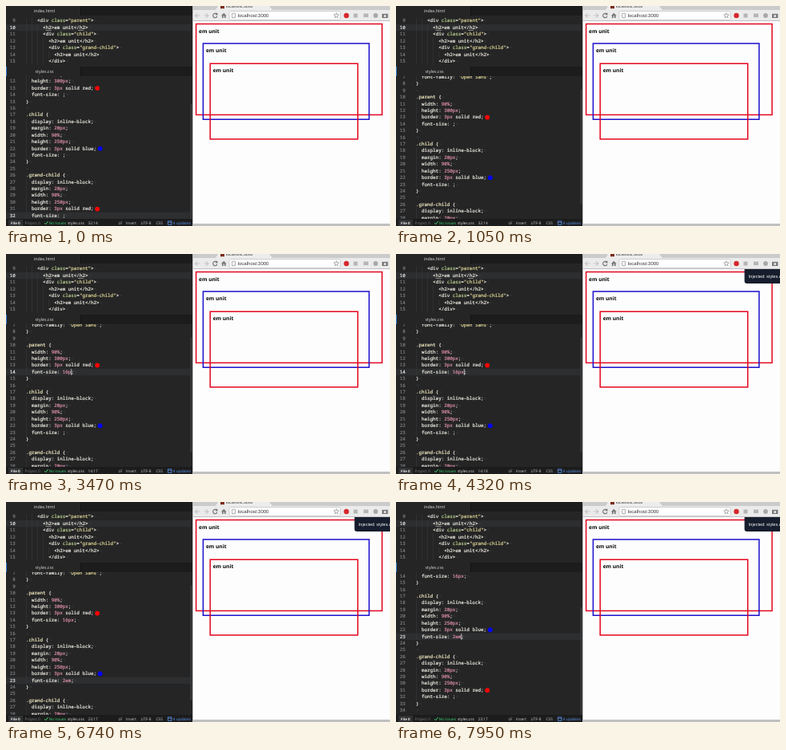
These frames come from a looping animation (480 px wide and 276 px high, 8000 ms). An HTML page with a canvas:

```html
<!DOCTYPE html>
<html lang="en">
<head>
<meta charset="utf-8">
<title>em unit</title>
<style>
html, body { margin: 0; width: 100%; height: 100%; overflow: hidden; background: #252526; }
canvas { display: block; width: 480px; height: 276px; }
</style>
</head>
<body>
<canvas id="stage"></canvas>
<script>
const W = 480, H = 276, LOOP = 8000;
const CHAR = 3.52, PITCH = 8.42, CODE_X = 25;
const MONO = '5.87px "Noto Sans Mono", "DejaVu Sans Mono", monospace';
const SANS = '"Open Sans", "Noto Sans", sans-serif';
const ARIAL = '"Liberation Sans", sans-serif';
const C = {
  bg: '#252526', bar: '#1c1c1d', line: '#2d2e30', plain: '#e6e4da',
  name: '#ece5bd', value: '#d48ba0', string: '#d8d092', attr: '#b5cc8a',
  faint: '#4a4c4d', guide: '#38393a', number: '#77797a', active: '#e0e0e0'
};

const canvas = document.getElementById('stage');
const ctx = canvas.getContext('2d');
const dpr = window.devicePixelRatio || 1;
canvas.width = W * dpr;
canvas.height = H * dpr;

const markup = [
  '    <div class="parent">', '      <h2>em unit</h2>', '      <div class="child">',
  '        <h2>em unit</h2>', '        <div class="grand-child">',
  '          <h2>em unit</h2>', '        </div>'
];

// Timed editor events: caret moves, keystrokes and the first save.
const keys = [
  { at: 2900, line: 14, text: '1' }, { at: 3060, line: 14, text: '16' },
  { at: 3350, line: 14, text: '16p' }, { at: 3500, line: 14, text: '16px' },
  { at: 4900, line: 23, text: '2' }, { at: 5060, line: 23, text: '2e' },
  { at: 5230, line: 23, text: '2em' }
];
const moves = [
  { at: -400, line: 32, text: '' }, { at: 1900, line: 14, text: '' }, { at: 4700, line: 23, text: '' }
];
const edits = [...moves, ...keys].sort((a, b) => a.at - b.at);
const SAVED = 4260;

const clamp = v => Math.max(0, Math.min(1, v));
const easeOut = p => 1 - (1 - p) * (1 - p);
const last = (list, t) => list.filter(e => e.at <= t).pop();

// Centre of line 14 as the pane scrolls.
const REST = 111.5;
function scrollY(t) {
  const up = easeOut(clamp((t - 80) / 740));
  const down = easeOut(clamp((t - 6850) / 857));
  return REST + 36.6 * up - 55 * down;
}

function rect(x, y, w, h, color) {
  ctx.fillStyle = color;
  ctx.fillRect(x, y, w, h);
}

function text(str, x, y, font, color, align = 'left') {
  ctx.font = font;
  ctx.fillStyle = color;
  ctx.textAlign = align;
  ctx.fillText(str, x, y);
}

// Medium weight: a thin outline around the regular face.
function codeText(str, x, y, color, align) {
  text(str, x, y, MONO, color, align);
  ctx.strokeStyle = color;
  ctx.lineWidth = 0.22;
  ctx.strokeText(str, x, y);
}

function stroke(color, width, path) {
  ctx.strokeStyle = color;
  ctx.lineWidth = width;
  ctx.beginPath();
  path();
  ctx.stroke();
}

function disc(x, y, r, color) {
  ctx.fillStyle = color;
  ctx.beginPath();
  ctx.arc(x, y, r, 0, 7);
  ctx.fill();
}

function clip(x, y, w, h, draw) {
  ctx.save();
  ctx.beginPath();
  ctx.rect(x, y, w, h);
  ctx.clip();
  draw();
  ctx.restore();
}

function htmlColor(token) {
  if (token[0] === '"') return C.string;
  return token === 'class' ? C.attr : C.plain;
}

function cssColor(token) {
  if (token[0] === "'") return C.string;
  if (token[0] === '.') return C.name;
  return /^\d/.test(token) ? C.value : C.plain;
}

function codeLine(number, source, y, active, pattern, color) {
  if (active) rect(0, y - 4.3, 231, PITCH, C.line);
  codeText(number, 11.7, y, active ? C.active : C.number, 'right');
  const indent = source.search(/\S|$/);
  for (let i = 0; i < indent; i += 2) {
    rect(CODE_X + i * CHAR, y - PITCH / 2, 0.6, PITCH, C.guide);
  }
  for (const m of source.matchAll(pattern)) {
    codeText(m[0], CODE_X + m.index * CHAR, y, color(m[0]));
  }
  text('¬', CODE_X + source.length * CHAR, y, MONO, C.faint);
}

function block(selector, height, color, size, extra) {
  return [
    selector + ' {', ...extra, '  width: 90%;', `  height: ${height}px;`,
    `  border: 3px solid ${color};`, `  font-size: ${size};`, '}', ''
  ];
}

function styles(t) {
  const typed = n => (last(keys.filter(k => k.line === n), t) || { text: '' }).text;
  const inline = ['  display: inline-block;', '  margin: 20px;'];
  return [
    "  font-family: 'Open Sans';", '}', '',
    ...block('.parent', 300, 'red', typed(14), []),
    ...block('.child', 250, 'blue', typed(23), inline),
    ...block('.grand-child', 250, 'red', '', inline)
  ];
}

function tab(y, label) {
  rect(0, y, 233, 12, C.bar);
  rect(0, y, 93, 12, C.bg);
  rect(93, y, 0.7, 12, '#111');
  text(label, 48, y + 6.2, `5.3px ${SANS}`, '#e4e4e4', 'center');
}

function markupPane() {
  markup.forEach((source, i) => {
    codeLine(9 + i, source, 18.8 + i * PITCH, i === 1, /"[^"]*"|em unit|[\w-]+|[<>\/=]+/g, htmlColor);
  });
  rect(49.5, 30.2, 7, 0.7, '#a5a99e');
  rect(90, 30.2, 7, 0.7, '#a5a99e');
  tab(0, 'index.html');
}

function stylePane(t) {
  const top = scrollY(t);
  const edit = last(edits, t);
  const lineY = n => top + (n - 14) * PITCH;
  clip(0, 88, 233, 179, () => {
    styles(t).forEach((source, i) => {
      const n = 7 + i, y = lineY(n);
      codeLine(n, source, y, n === edit.line, /'[^']*'|\.[\w-]+|[\w%-]+|[:;{}]/g, cssColor);
      const swatch = source.match(/solid (\w+);/);
      if (swatch) disc(CODE_X + source.length * CHAR + 4.7, y, 2.9, swatch[1] === 'red' ? '#f80404' : '#0404f8');
    });
    if ((t - edit.at) % 800 < 400) {
      rect(CODE_X + (13 + edit.text.length) * CHAR, lineY(edit.line) - 3.9, 0.8, 7.8, '#d5d9dc');
    }
    rect(230.6, 123 - (top - REST) * 0.5, 1.8, 144, '#3b3d3f');
  });
  tab(76, 'styles.css');
  rect(0, 76, 1, 12, '#3d7fd6');
}

function statusBar(t) {
  const edit = last(edits, t), y = 272.4;
  const put = (str, x, color = '#cfd1d2') => text(str, x, y, `4.8px ${SANS}`, color);
  rect(0, 267, 233, 9, '#1c1c1d');
  rect(3, 268, 18, 8, '#303132');
  text('File 0', 6, y, `bold 4.5px ${SANS}`, '#eee');
  put('Project 0', 23.5, '#777a7c');
  stroke('#3fd673', 1, () => {
    ctx.moveTo(48, 272.2);
    ctx.lineTo(49.7, 273.8);
    ctx.lineTo(52.5, 270.2);
  });
  put('No Issues', 53.5, '#3fd673');
  put('styles.css', 77, '#e4e4e4');
  put(`${edit.line}:${14 + edit.text.length}`, 102.5);
  put('LF', 140.5);
  put('Insert', 150);
  put('UTF-8', 168.5);
  put('CSS', 187.5);
  stroke('#5f97f0', 0.8, () => ctx.rect(202.4, 269.9, 4.6, 4.4));
  stroke('#5f97f0', 0.6, () => {
    ctx.moveTo(202.4, 271.5);
    ctx.lineTo(207, 271.5);
  });
  put('4 updates', 208.8, '#5f97f0');
}

function arrow(x, dir) {
  stroke('#c6c6c6', 1.2, () => {
    ctx.moveTo(x - 3 * dir, 12);
    ctx.lineTo(x + 3 * dir, 12);
    ctx.moveTo(x, 9.4);
    ctx.lineTo(x + 3 * dir, 12);
    ctx.lineTo(x, 14.6);
  });
}

function home(x) {
  ctx.fillStyle = '#777';
  ctx.beginPath();
  ctx.moveTo(x - 3.4, 12.2);
  ctx.lineTo(x, 8.8);
  ctx.lineTo(x + 3.4, 12.2);
  ctx.fill();
  rect(x - 2.3, 12, 1.7, 3, '#777');
  rect(x + 0.6, 12, 1.7, 3, '#777');
}

function star(x, y) {
  stroke('#888', 0.7, () => {
    for (let i = 0; i < 10; i++) {
      const r = i % 2 ? 1.5 : 3.4, a = (i / 5 - 0.5) * Math.PI;
      ctx.lineTo(x + r * Math.cos(a), y + r * Math.sin(a));
    }
    ctx.closePath();
  });
}

function toolbar() {
  rect(234, 0, 246, 5, '#cbcbcb');
  ctx.fillStyle = '#ececec';
  ctx.beginPath();
  ctx.moveTo(262, 5);
  ctx.lineTo(265, 0);
  ctx.lineTo(329, 0);
  ctx.lineTo(333, 5);
  ctx.fill();
  rect(268, 0, 5, 3.2, '#7d2a1a');
  clip(274, 0, 52, 5, () => text('localhost:3000', 275, 0.6, `5.2px ${ARIAL}`, '#333'));
  rect(234, 5, 246, 13.6, '#ebebeb');
  rect(234, 18.2, 246, 0.8, '#b4b4b4');
  arrow(239.5, -1);
  arrow(250, 1);
  stroke('#777', 1.2, () => ctx.arc(261.3, 12, 2.6, 0.2, 5.4));
  rect(262, 8.8, 2.5, 2.5, '#777');
  home(272.3);
  rect(279, 6.5, 139, 10.8, '#fff');
  stroke('#bdbdbd', 0.7, () => ctx.roundRect(279, 6.5, 139, 10.8, 1.5));
  stroke('#888', 0.7, () => ctx.rect(282.7, 9.2, 3.8, 5.4));
  text('localhost:3000', 289.7, 12.2, `6px ${ARIAL}`, '#333');
  star(413, 12);
  disc(425.5, 12, 3.2, '#d8262c');
  rect(434.5, 9.5, 5, 5, '#b5b5b5');
  rect(447, 9.5, 6, 4.6, '#b5b5b5');
  disc(462, 12, 2.9, '#a8a8a8');
  rect(470, 9.8, 7.4, 5.2, '#777');
  disc(473.7, 12.4, 1.5, '#ebebeb');
}

function frame(left, top, right, bottom, color) {
  stroke(color, 1.5, () => ctx.rect(left, top, right - left, bottom - top));
  text('em unit', left + 3.5, top + 9.4, `bold 6.6px ${SANS}`, '#080808');
}

function browser(t) {
  rect(233.4, 0, 246.6, H, '#fdfdfd');
  rect(233.4, 0, 0.6, H, '#c4c4c4');
  toolbar();
  frame(237.6, 22.5, 470.1, 136.4, '#e3061f');
  frame(246.4, 47.1, 453.9, 142.3, '#1c10cc');
  frame(255.2, 72.3, 439.7, 167.1, '#e3061f');
  rect(234, 273, 246, 3, '#c0c0c0');
  if (t >= SAVED) {
    ctx.fillStyle = '#161d2c';
    ctx.beginPath();
    ctx.roundRect(435.6, 19, 60, 18, [0, 0, 0, 3]);
    ctx.fill();
    text('Injected: styles.css', 440.8, 28.2, `5.5px ${ARIAL}`, '#fff');
  }
}

function draw(now) {
  const t = now % LOOP;
  ctx.setTransform(dpr, 0, 0, dpr, 0, 0);
  ctx.textBaseline = 'middle';
  ctx.textRendering = 'geometricPrecision';
  rect(0, 0, W, H, C.bg);
  markupPane();
  stylePane(t);
  statusBar(t);
  browser(t);
}

const start = performance.now();
function tick() {
  draw(performance.now() - start);
  requestAnimationFrame(tick);
}
tick();
</script>
</body>
</html>
```
